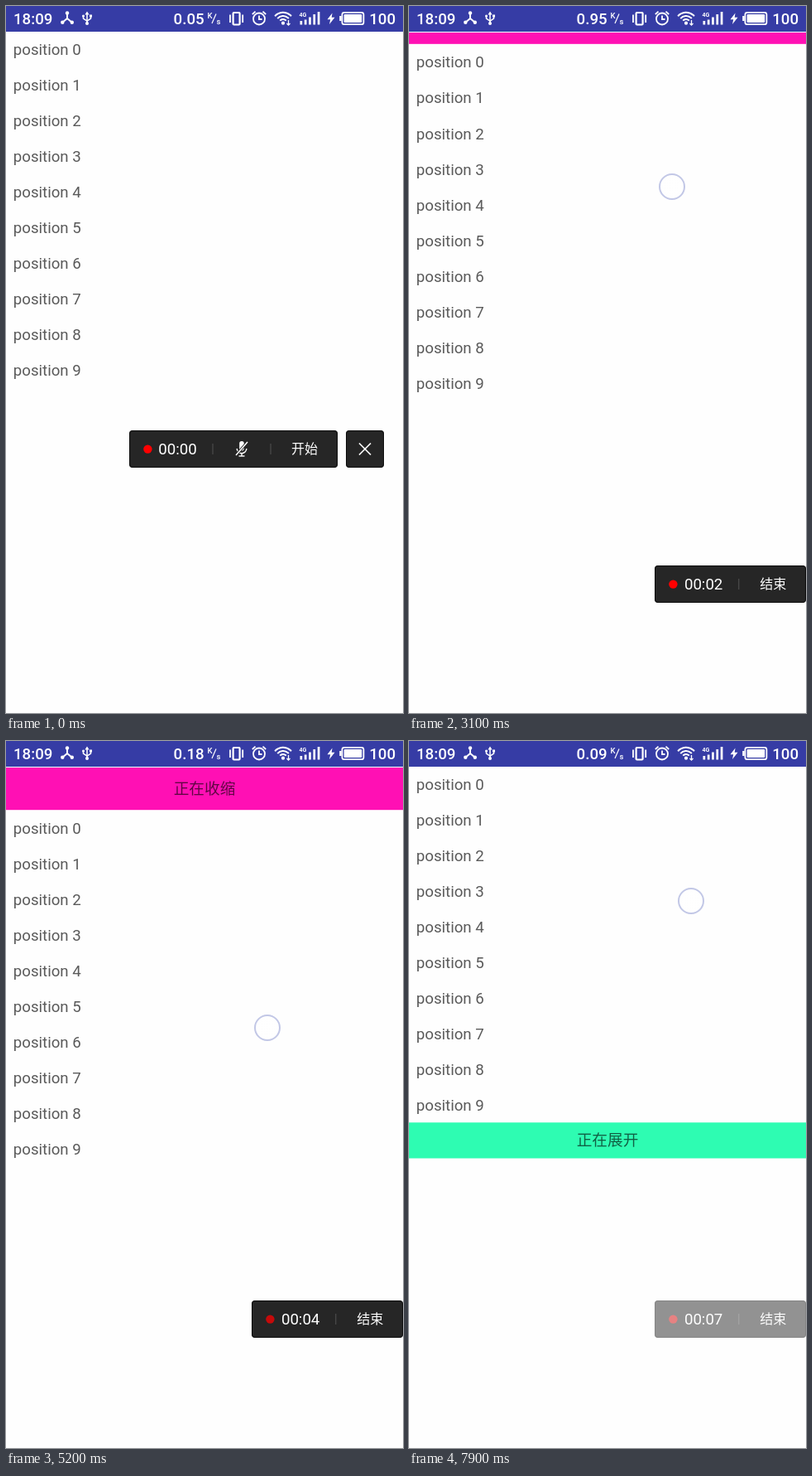
An HTML page with a canvas that plays this animation: 480x853 px, repeating every 8 s.

```html
<!DOCTYPE html>
<html lang="zh">
<head>
<meta charset="utf-8">
<title>Pull to expand</title>
<style>
html, body { margin: 0; width: 100%; height: 100%; overflow: hidden; background: #fefefe; }
canvas { display: block; width: 480px; height: 853px; }
</style>
</head>
<body>
<canvas id="stage" width="480" height="853"></canvas>
<script>
const ctx = document.getElementById('stage').getContext('2d');
const LOOP = 8000, STEP = 100;
const TOP = 31, ROW = 43.06, PAD = 9, LINE = 25;
const PAPER = '#fefefe', PLATE = '#262626';
const SANS = 'Roboto, "Noto Sans CJK SC", "Noto Sans CJK", sans-serif';
const CJK = '"Noto Sans CJK SC", "Noto Sans CJK", sans-serif';

// Finger paths: time, x, y
const DRAG = [[700, 308, 553], [800, 300, 600], [1000, 268, 741], [1150, 285, 745],
  [1400, 325, 722], [1600, 331, 716]];
const PULL = [[2600, 320, 173], [2750, 320, 173], [3100, 318, 218], [4000, 311, 305],
  [4700, 312, 373], [5200, 316, 346], [6100, 333, 305], [6550, 337, 265],
  [7200, 341, 200], [7900, 341, 193]];
const TURN = 4700, PEAK_Y = 373, PEAK = 71;

const clamp = (v, a, b) => Math.max(a, Math.min(b, v));

function along(path, t) {
  let i = 1;
  while (i < path.length - 1 && t > path[i][0]) i++;
  const [t0, x0, y0] = path[i - 1], [t1, x1, y1] = path[i];
  const k = clamp((t - t0) / (t1 - t0), 0, 1);
  return { x: x0 + (x1 - x0) * k, y: y0 + (y1 - y0) * k };
}

function text(str, x, y, size, color, weight = 400, align = 'left', family = SANS) {
  ctx.font = `${weight} ${size}px ${family}`;
  ctx.fillStyle = color;
  ctx.textAlign = align;
  ctx.fillText(str, x, y);
}

function line(...p) {
  ctx.beginPath();
  for (let i = 0; i < p.length; i += 2) ctx.lineTo(p[i], p[i + 1]);
  ctx.stroke();
}

function arc(x, y, r, a = 0, b = Math.PI * 2, fill = false) {
  ctx.beginPath();
  ctx.arc(x, y, r, a, b);
  fill ? ctx.fill() : ctx.stroke();
}

const dot = (x, y, r) => arc(x, y, r, 0, Math.PI * 2, true);

function box(x, y, w, h, r, fill = true) {
  ctx.beginPath();
  ctx.roundRect(x, y, w, h, r);
  fill ? ctx.fill() : ctx.stroke();
}

function poly(...p) {
  ctx.beginPath();
  for (let i = 0; i < p.length; i += 2) ctx.lineTo(p[i], p[i + 1]);
  ctx.fill();
}

function pen(color, width) {
  ctx.strokeStyle = ctx.fillStyle = color;
  ctx.lineWidth = width;
}

function statusBar(t) {
  const speed = t < 2200 ? '0.05' : t < 4900 ? '0.95' : t < 7600 ? '0.18' : '0.09';
  const white = '#fff';
  ctx.fillStyle = '#363ca5';
  ctx.fillRect(0, 0, 480, TOP);
  text('18:09', 9, 21.7, 18.67, white, 500);
  text(speed, 202.6, 21.7, 18.67, white, 500);
  text('100', 439.2, 21.7, 18.67, white, 500);
  text('K', 243.5, 15, 9.5, white, 500);
  text('s', 254.5, 21.5, 9.5, white, 500);
  pen(white, 1.2);
  line(249, 21, 254, 9.5);

  // Node and USB
  ctx.lineWidth = 2;
  line(74, 8, 74, 15, 68, 20);
  line(74, 15, 80, 20);
  dot(74, 8.5, 2.2);
  dot(68.3, 19.8, 2.2);
  dot(79.8, 19.8, 2.2);
  ctx.lineWidth = 1.5;
  line(98, 9, 98, 21);
  line(93.5, 12, 93.5, 15, 98, 18, 102.5, 15, 102.5, 12);
  poly(98, 6.5, 100.6, 10.5, 95.4, 10.5);
  dot(98, 21, 2);
  dot(93.5, 12, 1.5);
  ctx.fillRect(101, 10.5, 3, 3);

  // Vibrate
  ctx.lineWidth = 2.2;
  box(274.6, 8, 8, 14.5, 1, false);
  ctx.lineWidth = 1.8;
  line(271, 10.5, 271, 20);
  line(286.2, 10.5, 286.2, 20);

  // Alarm
  arc(306, 15.5, 7);
  line(306, 11.5, 306, 16, 309.5, 16);
  line(297.8, 10, 301.5, 6.7);
  line(310.5, 6.7, 314.2, 10);

  // Wi-Fi
  ctx.lineWidth = 2;
  for (const r of [5, 9, 13.2]) arc(335, 21, r, -Math.PI * .77, -Math.PI * .23);
  dot(335, 20.7, 2.1);
  ctx.lineWidth = 1.3;
  line(341.5, 17, 341.5, 23);
  line(339.5, 21, 341.5, 23, 343.5, 21);

  // Signal
  text('4G', 354.5, 12.5, 7, white, 700);
  [4.5, 6, 9, 12.5, 15.5].forEach((h, i) => ctx.fillRect(355.5 + i * 5.3, 22.5 - h, 2.7, h));

  // Battery
  poly(394.5, 8.5, 388.5, 16.2, 392.2, 16.2, 391, 22, 397.5, 13.8, 393.7, 13.8);
  ctx.lineWidth = 1.8;
  box(406.4, 7.8, 26, 14.4, 2.5, false);
  box(408.6, 10, 21.6, 10, 1);
  ctx.fillRect(403.2, 12, 2.4, 6);
}

function panel(y, h, color, label) {
  if (h <= 0) return;
  ctx.fillStyle = color;
  ctx.fillRect(0, y, 480, h);
  if (h <= PAD * 2) return;
  ctx.save();
  ctx.beginPath();
  ctx.rect(0, y + PAD, 480, h - PAD * 2);
  ctx.clip();
  const mid = y + Math.max(PAD + LINE / 2, h / 2);
  text(label, 240, mid + 6.5, 18.67, 'rgba(0,0,0,.62)', 400, 'center', CJK);
  ctx.restore();
}

function listOffset(t, y) {
  if (t < 2600) return 0;
  const drop = PEAK_Y - y;
  return Math.max(0, PEAK - drop * (t < TURN ? .356 : .66));
}

function page(t) {
  const y = along(PULL, t).y;
  const off = listOffset(t, y);
  panel(TOP + 1, off - 2, '#ff10b4', t < TURN ? '正在展开' : '正在收缩');
  for (let i = 0; i < 10; i++)
    text('position ' + i, 8.8, 58.6 + off + i * ROW, 18.67, '#5a5a5a');
  if (t > 6550) panel(460.3, clamp((265 - y) * .67, 0, 43.2), '#2efcb2', '正在展开');
}

function plate(x, y, w) {
  pen(PLATE, 1);
  box(x, y, w, 45, 4);
  ctx.strokeStyle = '#0c0c0c';
  box(x + .5, y + .5, w - 1, 44, 3.5, false);
}

function dial(x, y, t, from) {
  const sec = Math.max(0, Math.floor((t - 700) / 1000));
  const glow = t < 700 ? 1 : .85 + .15 * Math.cos((t - 3100) / 1300 * Math.PI * 2);
  ctx.fillStyle = `rgba(255,0,0,${glow})`;
  dot(x + 22.4, y + 22.6, 5.2);
  text('00:0' + sec, x + from, y + 28.6, 18.67, '#fff');
}

function divider(x, y) {
  ctx.fillStyle = '#464646';
  ctx.fillRect(x - .7, y + 16, 1.4, 13);
}

function mic(x, y) {
  pen('#fff', 1.4);
  box(x - 2.8, y - 9, 5.6, 11.5, 2.8);
  arc(x, y, 5.8, 0, Math.PI);
  line(x, y + 6, x, y + 9);
  line(x - 3.5, y + 9, x + 3.5, y + 9);
  pen(PLATE, 3.4);
  line(x + 7, y - 8, x - 7, y + 8);
  pen('#fff', 1.5);
  line(x + 7, y - 8, x - 7, y + 8);
}

function startBar(t) {
  const x = 149, y = 512;
  plate(x, y, 252);
  plate(411, y, 46);
  dial(x, y, t, 35.3);
  divider(250, y);
  mic(285, 534);
  divider(320, y);
  text('开始', 361, 540, 16, '#fff', 400, 'center', CJK);
  pen('#fff', 1.7);
  line(427, 527.5, 441, 541.5);
  line(441, 527.5, 427, 541.5);
}

function recordBar(t) {
  const p = along(DRAG, t);
  const x = Math.round(p.x) - 34, y = Math.round(p.y) - 41;
  plate(x, y, 183);
  dial(x, y, t, 35.9);
  divider(x + 101.7, y);
  text('结束', x + 143.3, y + 27.8, 16, '#fff', 400, 'center', CJK);

  // Idle bar fades into the page
  ctx.globalAlpha = .5 * clamp((t - 6600) / 300, 0, 1);
  ctx.fillStyle = PAPER;
  ctx.fillRect(x, y, 183, 45);
  ctx.globalAlpha = 1;
}

function finger({ x, y }) {
  const glow = ctx.createRadialGradient(x, y, 0, x, y, 15.5);
  glow.addColorStop(0, 'rgba(255,255,255,.8)');
  glow.addColorStop(.6, 'rgba(255,255,255,.72)');
  glow.addColorStop(1, 'rgba(255,255,255,.45)');
  ctx.fillStyle = glow;
  dot(x, y, 15.2);
  pen('rgba(170,178,220,.72)', 2);
  arc(x, y, 15);
}

function draw(t) {
  ctx.fillStyle = PAPER;
  ctx.fillRect(0, 0, 480, 853);
  page(t);
  statusBar(t);
  t < 700 ? startBar(t) : recordBar(t);
  if (t >= 400 && t < 600) finger({ x: 361, y: 536 });
  else if (t >= 700 && t < 1600) finger(along(DRAG, t));
  else if (t >= 2600) finger(along(PULL, t));
}

const start = performance.now();
function tick() {
  const t = (performance.now() - start) % LOOP;
  draw(Math.floor(t / STEP) * STEP);
  requestAnimationFrame(tick);
}
tick();
</script>
</body>
</html>
```
